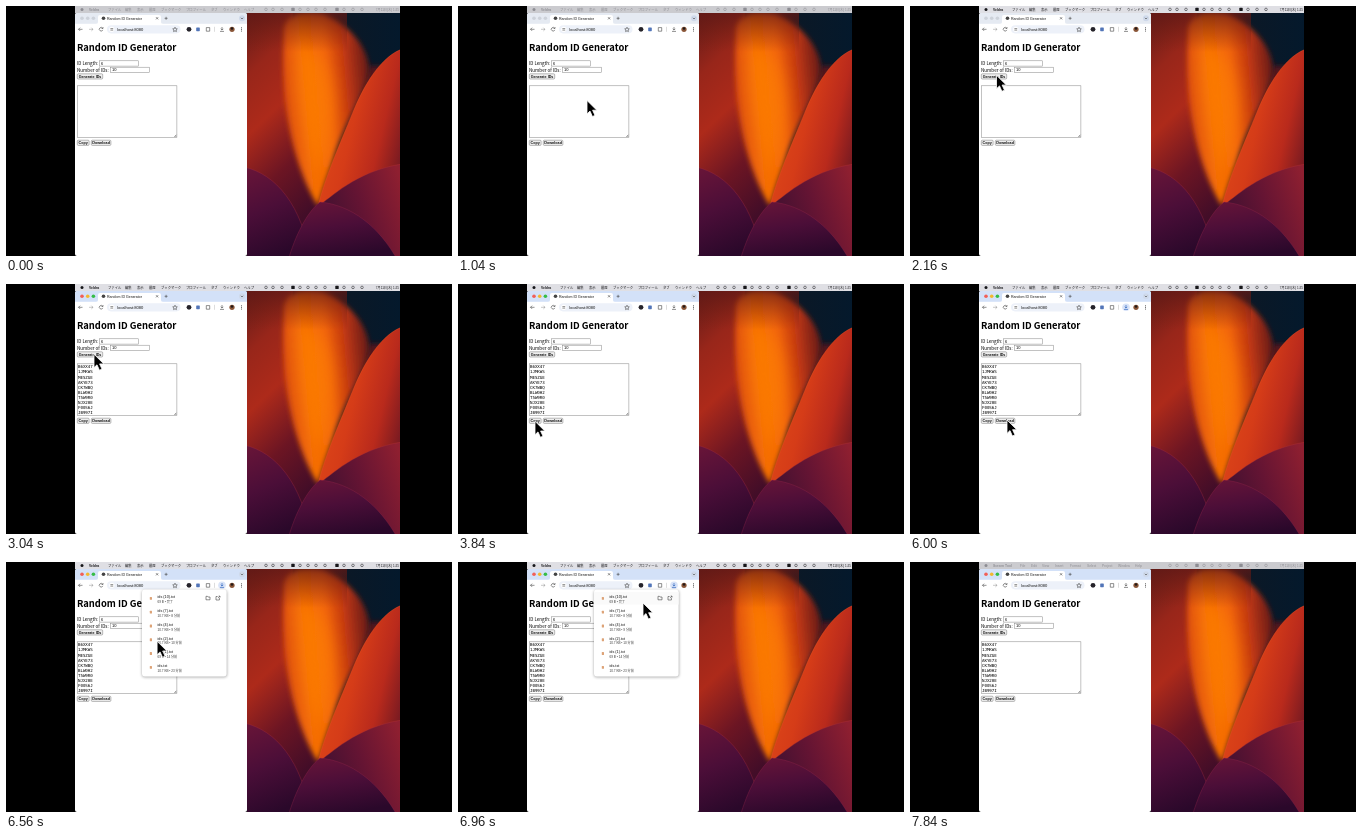
An HTML page for the animation above (8000 ms loop, 446x250 px).

```html
<!DOCTYPE html>
<html lang="en">
<head>
<meta charset="utf-8">
<title>Random ID Generator</title>
<style>
  html, body { margin: 0; width: 100%; height: 100%; overflow: hidden; background: #000; }
  svg { display: block; width: 446px; height: 250px; font-family: "Liberation Sans", "Noto Sans CJK JP", sans-serif; }
  text { white-space: pre; }
  .page { font-family: "Noto Sans CJK JP", "Noto Sans", sans-serif; }
  .btn rect { fill: #efefef; stroke: #777; stroke-width: .5; }
  .btn text { font-size: 3.7px; font-weight: bold; fill: #111; text-anchor: middle; }
  .btn.down rect { fill: #d2d2d2; }
  .field { fill: #fff; stroke: #858585; stroke-width: .5; }
  .line { fill: none; stroke: #444; stroke-width: .6; }
  .mono { font: 4.15px "DejaVu Sans Mono", monospace; fill: #000; }
</style>
</head>
<body>
<svg id="stage" viewBox="0 0 446 250" xmlns="http://www.w3.org/2000/svg">
  <defs>
    <clipPath id="desk"><rect x="241" y="0" width="153" height="250"/></clipPath>
    <filter id="soft" x="-20%" y="-20%" width="140%" height="140%"><feGaussianBlur stdDeviation="2.5"/></filter>
    <filter id="haze" x="-50%" y="-50%" width="200%" height="200%"><feGaussianBlur stdDeviation="8"/></filter>
    <filter id="shade" x="-20%" y="-20%" width="140%" height="140%"><feGaussianBlur stdDeviation="1.6"/></filter>
    <linearGradient id="sky" x1="0" y1="0" x2="1" y2="0">
      <stop offset="0" stop-color="#54191b"/><stop offset=".45" stop-color="#4c1619"/>
      <stop offset=".64" stop-color="#0b1826"/><stop offset="1" stop-color="#04192c"/>
    </linearGradient>
    <linearGradient id="left" x1="0" y1="0" x2=".3" y2="1">
      <stop offset="0" stop-color="#561819"/><stop offset=".28" stop-color="#98261a"/>
      <stop offset=".5" stop-color="#ad2a1a"/><stop offset=".75" stop-color="#6c1523"/>
      <stop offset="1" stop-color="#420d28"/>
    </linearGradient>
    <linearGradient id="mid" x1="0" y1=".4" x2="1" y2=".2">
      <stop offset="0" stop-color="#dc4d10"/><stop offset=".25" stop-color="#f56f06"/>
      <stop offset=".5" stop-color="#f26507"/><stop offset=".72" stop-color="#c23812"/>
      <stop offset="1" stop-color="#5e1818"/>
    </linearGradient>
    <linearGradient id="crown" x1="0" y1="0" x2="0" y2="1">
      <stop offset="0" stop-color="#5e1816" stop-opacity=".85"/><stop offset="1" stop-color="#7a2010" stop-opacity="0"/>
    </linearGradient>
    <linearGradient id="right" x1="0" y1=".35" x2="1" y2=".8">
      <stop offset="0" stop-color="#e04a18"/><stop offset=".4" stop-color="#d53c18"/>
      <stop offset=".7" stop-color="#b92a1c"/><stop offset="1" stop-color="#6d1722"/>
    </linearGradient>
    <linearGradient id="low" x1="0" y1=".6" x2="1" y2=".2">
      <stop offset="0" stop-color="#3b1030"/><stop offset=".5" stop-color="#641433"/>
      <stop offset="1" stop-color="#8e1f30"/>
    </linearGradient>
    <linearGradient id="base" x1="0" y1="0" x2=".3" y2="1">
      <stop offset="0" stop-color="#6a1538"/><stop offset=".5" stop-color="#4b0e38"/>
      <stop offset="1" stop-color="#2a082a"/>
    </linearGradient>
  </defs>

  <rect width="446" height="250"/>
  <g clip-path="url(#desk)">
    <rect x="241" width="153" height="250" fill="url(#sky)"/>
    <path d="M364 60Q340 118 312 200L345 200L394 60Z" fill="#53151a" filter="url(#soft)"/>
    <path d="M235 0H288Q277 70 288 130Q296 168 312 200L300 250H235Z" fill="url(#left)"/>
    <path d="M278 28C277 8 294 4 318 8C342 19 360 38 363 60C363 84 338 116 327 154L312 200C292 168 273 108 278 28Z" fill="url(#mid)" filter="url(#soft)"/>
    <path d="M293 45Q311 36 323 70Q335 112 315 170Q291 120 293 45Z" fill="#ff8200" opacity=".6" filter="url(#haze)"/>
    <rect x="241" y="0" width="100" height="46" fill="url(#crown)"/>
    <path d="M396 43C375 51 359 77 347 106C333 140 319 172 312 200L396 200Z" fill="url(#right)"/>
    <path d="M396 43C375 51 359 77 347 106C333 140 319 172 312 200" fill="none" stroke="#ee5a22" stroke-width=".6" opacity=".55"/>
    <path d="M312 200C325 192 350 165 396 158V255H312Z" fill="url(#low)"/>
    <path d="M312 200C325 192 350 165 396 158" fill="none" stroke="#b83430" stroke-width=".6" opacity=".6"/>
    <path d="M238 161C270 168 296 199 305 255H238Z" fill="url(#base)"/>
    <path d="M238 161C270 168 296 199 305 255" fill="none" stroke="#a32a42" stroke-width=".6" opacity=".6"/>
    <path d="M282 255C289 230 301 206 314 196C345 199 373 220 392 255Z" fill="url(#base)"/>
    <path d="M282 255C289 230 301 206 314 196C345 199 373 220 392 255" fill="none" stroke="#92264a" stroke-width=".6" opacity=".6"/>
  </g>

  <g id="bar"></g>
  <g id="window"></g>
  <g id="popup"></g>
  <path id="cursor" d="M0 0V13.4L3 10.6L5.4 16L8 14.9L5.6 9.7H9.8Z" stroke="#fff" stroke-width=".8" stroke-linejoin="round"/>
</svg>
<script>
const LOOP = 8000, STEP = 80;
const $ = id => document.getElementById(id);
const text = (x, y, size, str, extra = '') => `<text x="${x}" y="${y}" font-size="${size}" ${extra}>${str}</text>`;
const box = (x, y, w, h, fill, r = 0, extra = '') => `<rect x="${x}" y="${y}" width="${w}" height="${h}" rx="${r}" fill="${fill}" ${extra}/>`;
const dot = (x, y, r, fill, extra = '') => `<circle cx="${x}" cy="${y}" r="${r}" fill="${fill}" ${extra}/>`;
const line = (d, extra = '') => `<path class="line" d="${d}" ${extra}/>`;
const field = (x, y, w, h) => box(x, y, w, h, '', 0, 'class="field"');
const button = (id, x, y, w, label) =>
  `<g class="btn" id="${id}">${box(x, y, w, 5.2, '', 1)}${text(x + w / 2, y + 3.95, 3.7, label)}</g>`;

// Menu bar
const jaMenu = [[83, 'Veldra', 'font-weight="bold"'], [102, 'ファイル'], [119, '編集'], [131, '表示'], [143, '履歴'],
  [155, 'ブックマーク'], [180, 'プロフィール'], [205, 'タブ'], [217, 'ウィンドウ'], [238, 'ヘルプ']];
const enMenu = [[83, 'Screen Tool', 'font-weight="bold"'], [110, 'File'], [121, 'Edit'], [132, 'View'], [145, 'Insert'],
  [160, 'Format'], [177, 'Select'], [192, 'Project'], [208, 'Window'], [225, 'Help']];
const menu = (id, items) => `<g id="${id}">${items.map(([x, s, e]) => text(x, 4.7, 3.35, s, e)).join('')}</g>`;
const status = [260, 267, 276, 287, 294, 302, 310, 319, 331, 338, 347, 356]
  .map((x, i) => i === 3 || i === 8 ? box(x - 1.7, 1.8, 3.4, 3.2, 'currentColor', .6)
                                   : dot(x, 3.4, 1.3, 'none', 'stroke="currentColor" stroke-width=".5"')).join('');
$('bar').innerHTML = box(69, 0, 325, 7, '#dcdce0', 0, 'id="barFill"') +
  `<g id="barInk" fill="currentColor">${dot(76, 3.4, 1.5, 'currentColor')}${menu('ja', jaMenu)}${menu('en', enMenu)}
   ${status}${text(393, 4.7, 3.1, '7月11日(木) 1:25', 'text-anchor="end"')}</g>`;

// Browser window
const ids = ['B6XX47', '1JMKWS', 'ME5ZGE', 'AKYE73', 'CK7WBQ', 'BLW0H2', 'T5W9R0', 'NJX20E', 'F00S6J', 'JB997I'];
$('window').innerHTML = box(69, 7, 172, 243, '#fff', 2) +
  box(69, 7, 172, 14, '#e5eaf2', 2, 'id="strip"') +
  [76, 81.7, 87.4].map(x => dot(x, 12.2, 1.8, '#cdd2da', 'class="light"')).join('') +
  `<path d="M90 18Q92 18 92 16V11Q92 9 94 9H153Q155 9 155 11V16Q155 18 157 18Z" fill="#fff"/>` +
  box(69, 17.8, 172, 12, '#fff') +
  dot(97.5, 12.2, 1.8, '#444') +
  text(101, 13.5, 3.55, 'Random ID Generator', 'fill="#111"') +
  line('M150 11.2l2.2 2.2m0-2.2l-2.2 2.2M158.6 12.3h3m-1.5-1.5v3') +
  dot(236, 12.3, 3, '#cfd9ea') + line('M234.8 11.8l1.2 1.2l1.2-1.2') +
  line('M76.5 23.3h-4m1.6-1.6l-1.6 1.6l1.6 1.6') +
  line('M83 23.3h4m-1.6-1.6l1.6 1.6l-1.6 1.6', 'opacity=".5"') +
  line('M96.6 22.2a1.8 1.8 0 1 0 .2 1.7M97 21v1.5h-1.5') +
  box(101, 19.2, 73.5, 8.2, '#edf1f9', 4.1) +
  dot(105.8, 23.3, 2.6, '#fff') + line('M104.4 22.6h2.8m-2.8 1.5h2.8') +
  text(111, 24.8, 4.1, 'localhost:8080', 'fill="#111"') +
  line('M169 21.2l.7 1.5l1.6.2l-1.2 1.1l.3 1.6l-1.4-.8l-1.4.8l.3-1.6l-1.2-1.1l1.6-.2Z') +
  dot(183, 23.3, 2.4, '#25232a') + box(190.2, 21.4, 3.6, 3.8, '#5275b8', .6) +
  line('M200.3 21.6h3.4v3.6h-3.4Z') + line('M208.5 20.8v5', 'opacity=".3"') +
  dot(216, 23.3, 3.8, '#d8e3f8', 'id="dlGlow"') +
  line('M216 21v3m-1.3-1.2l1.3 1.3l1.3-1.3M214 25.4h4', 'id="dlIcon"') +
  dot(226, 23.3, 2.6, '#8a5638') + dot(226, 22.5, 1.3, '#231a18') +
  [21.7, 23.3, 24.9].map(y => dot(235.5, y, .5, '#333')).join('') +
  `<g class="page">${text(71, 45.1, 9.4, 'Random ID Generator', 'font-weight="bold"')}
   ${text(71, 59.1, 4.5, 'ID Length:')}${text(71, 65.5, 4.6, 'Number of IDs:')}</g>` +
  field(93.6, 54.8, 38.8, 5.3) + text(95, 59, 4, '6') +
  field(104.6, 61.2, 38.8, 5.3) + text(106, 65.4, 4, '10') +
  button('gen', 71.3, 67.8, 25.4, 'Generate IDs') +
  field(71.3, 79.8, 99.6, 51.6) +
  line('M168.4 130.8l2-2m-.8 2l.8-.8') +
  `<g id="ids">${ids.map((s, i) => `<text class="mono" x="71.9" y="${84.4 + i * 5.05}">${s}</text>`).join('')}</g>` +
  button('copy', 71.3, 134.2, 11.8, 'Copy') + button('load', 85.3, 134.2, 19.6, 'Download');

// Downloads bubble
const files = [['ids (10).txt', '69 B • 完了'], ['ids (7).txt', '10.7 KB • 8 分前'], ['ids (4).txt', '10.7 KB • 9 分前'],
  ['ids (2).txt', '10.7 KB • 10 分前'], ['ids (1).txt', '69 B • 14 分前'], ['ids.txt', '10.7 KB • 23 分前']];
$('popup').innerHTML = box(136, 28.2, 85, 87, '#000', 3, 'opacity=".35" filter="url(#shade)"') +
  box(136, 27.4, 84.6, 87.2, '#fff', 3) + box(136, 30, 84.6, 12.6, '#fafafa', 0, 'id="hover"') +
  files.map(([name, note], i) => {
    const y = 36.1 + i * 13.8;
    return box(143.8, y - 1.2, 2.2, 2.9, '#dda377', .5) + text(151.5, y, 3.75, name, 'fill="#111"') +
      text(151.5, y + 4.8, 3.1, note, 'fill="#333"');
  }).join('') +
  line('M200 34.3h1.4l.6.7h2v2.8h-4Z') + line('M213.4 36v2h-3.4v-3.5h1.6m1-.4h1.4v1.4m0-1.4l-2 2');

// Cursor stops: time, x, y
const path = [[160, 272, 236], [400, 232, 190], [640, 160, 121], [880, 131, 99], [960, 131, 99], [1040, 129, 94.5],
  [1280, 109, 80], [1600, 88, 69.5], [1760, 88, 69.5], [1920, 86.5, 69.3], [2560, 86.5, 69.3], [2720, 88, 70.2],
  [3200, 88, 70.2], [3440, 82, 105], [3760, 77, 137.3], [4240, 77, 137.3], [4560, 91, 141], [4880, 97, 136],
  [6160, 97, 136], [6480, 145, 86], [6800, 184, 43], [6960, 185, 41], [7200, 185, 41], [7440, 225, 21], [7680, 247, 9]];
const within = (t, a, b) => t >= a && t < b;
const show = (id, on) => $(id).style.display = on ? '' : 'none';

function cursorAt(t) {
  const i = path.findIndex(p => p[0] > t);
  if (i < 0) return path[path.length - 1].slice(1);
  if (i === 0) return path[0].slice(1);
  const [a, x, y] = path[i - 1], [b, u, v] = path[i];
  const k = (t - a) / (b - a), e = k * k * (3 - 2 * k);
  return [x + (u - x) * e, y + (v - y) * e];
}

function draw(time) {
  const t = Math.floor(time % LOOP / STEP) * STEP;
  const barOn = within(t, 2160, 7600), lit = t >= 2240, loading = within(t, 5760, 7360);
  $('barFill').setAttribute('fill', barOn ? '#dfdfe4' : '#cbcbcf');
  $('barInk').style.color = barOn ? '#17171a' : '#8d8d93';
  show('ja', t < 7600);
  show('en', t >= 7600);
  $('strip').setAttribute('fill', lit ? '#d3e1f8' : '#e5eaf2');
  document.querySelectorAll('.light').forEach((el, i) =>
    el.setAttribute('fill', lit ? ['#f25f57', '#f3b82f', '#35bd48'][i] : '#cdd2da'));
  $('gen').classList.toggle('down', within(t, 2720, 2960));
  $('copy').classList.toggle('down', within(t, 4080, 4240));
  $('load').classList.toggle('down', within(t, 5600, 5760));
  $('dlIcon').style.stroke = loading ? '#1a56b8' : '';
  show('dlGlow', loading);
  show('ids', t >= 2960);
  show('popup', within(t, 6240, 7360));
  show('hover', t >= 6800);
  show('cursor', within(t, 160, 7760));
  $('cursor').setAttribute('transform', `translate(${cursorAt(t).map(n => n.toFixed(2))})`);
}

const start = performance.now();
(function tick() {
  draw(performance.now() - start);
  requestAnimationFrame(tick);
})();
</script>
</body>
</html>
```
